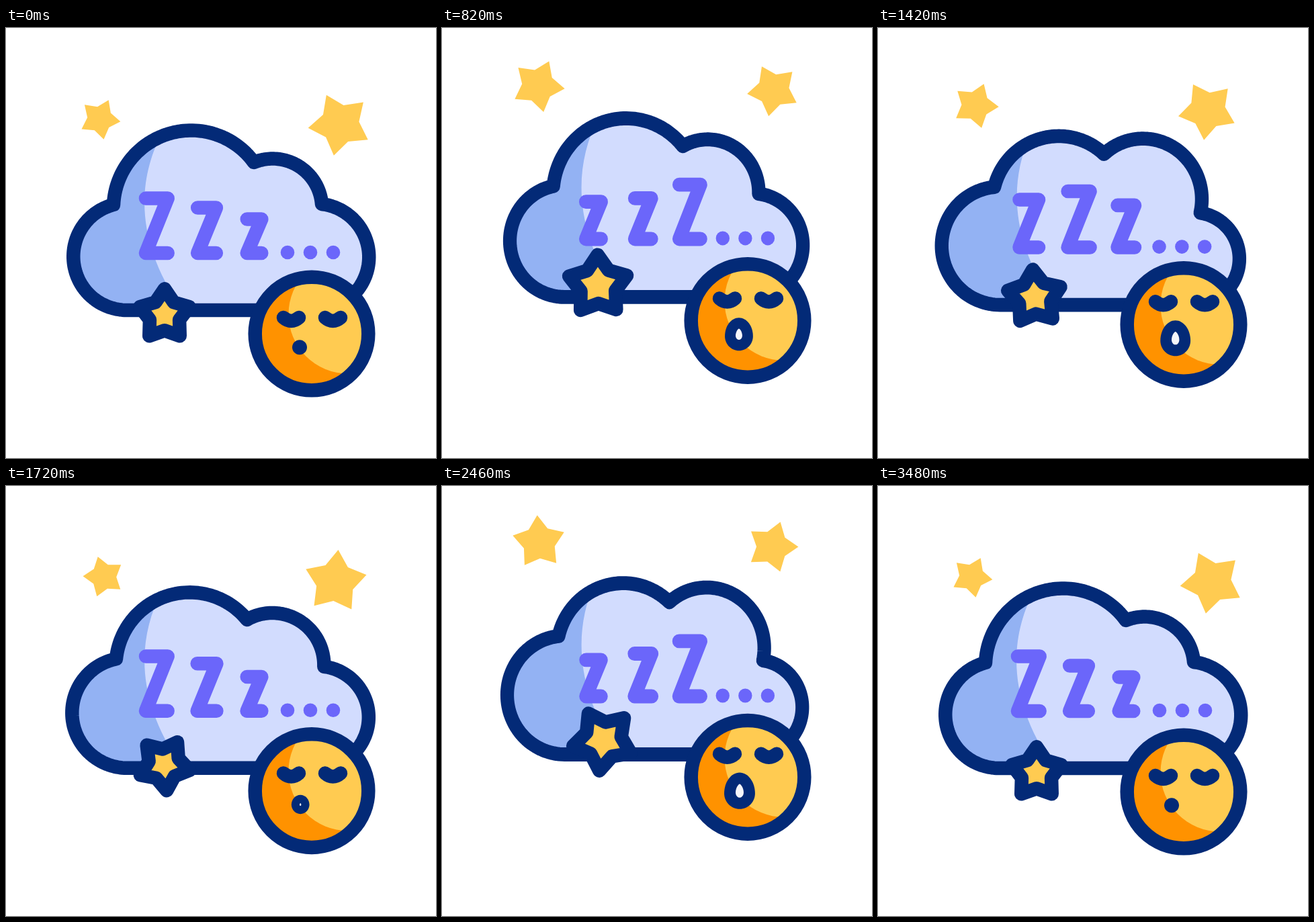
Recreate the animation shown at these times as an HTML page with a canvas. Size 640x640 px, loop 3600 ms.

```html
<!DOCTYPE html>
<html lang="en">
<head>
<meta charset="utf-8">
<style>
  html, body { margin: 0; height: 100%; overflow: hidden; background: #fff; }
  canvas { display: block; }
</style>
</head>
<body>
<canvas id="stage" width="640" height="640"></canvas>
<script>
const ctx = document.getElementById('stage').getContext('2d');
const NAVY = '#032a77', LIGHT = '#d2dcfe', SHADE = '#93b2f3', VIOLET = '#6b66fa',
      YELLOW = '#ffcb51', ORANGE = '#ff9200';
const LOOP = 3600, LINE = 20.5;
const { PI, sin, cos, hypot, atan2 } = Math;

// Turning points of each up-and-down motion, in ms
const CLOUD_KEYS = [220, 940, 1770, 2540, 3380];
const PUFF_KEYS = [520, 1340, 1945, 2600, 3420];
const FACE_KEYS = [240, 1060, 1840, 2630, 3480];
const MOUTH_KEYS = [280, 1180, 1910, 2700, 3490];

// Lobe centres and the creases between them, at rest and puffed
const CALM = { lobes: [[180, 340], [276, 268], [397, 268], [461, 341]],
               creases: [[160, 263], [369, 200], [470, 262]] };
const PUFFED = { lobes: [[181, 332], [268, 270], [391, 260], [471, 352.5]],
                 creases: [[173, 245], [335, 197], [481, 285]] };

const clamp = x => Math.min(1, Math.max(0, x));
const swing = angle => (1 - cos(angle)) / 2;

// Grows by PI between neighbouring turning points
function phase(t, keys) {
  let sum = 0;
  for (let i = 1; i < keys.length; i++)
    sum += clamp((t - keys[i - 1]) / (keys[i] - keys[i - 1]));
  return sum * PI;
}

function fill(color) { ctx.fillStyle = color; ctx.fill(); }

function stroke(color) {
  ctx.strokeStyle = color;
  ctx.lineWidth = LINE;
  ctx.lineCap = ctx.lineJoin = 'round';
  ctx.stroke();
}

function disc(x, y, r, color) {
  ctx.beginPath();
  ctx.arc(x, y, r, 0, 2 * PI);
  if (color) fill(color);
}

// Clockwise curve around a centre; the radius blends from one end to the other
function lobe([x, y], [ax, ay], [bx, by]) {
  const from = atan2(ay - y, ax - x), r0 = hypot(ax - x, ay - y), r1 = hypot(bx - x, by - y);
  const turn = (atan2(by - y, bx - x) - from + 2 * PI) % (2 * PI);
  for (let k = 0; k <= 1; k += 1 / 64) {
    const a = from + turn * k, r = r0 + (r1 - r0) * k;
    ctx.lineTo(x + r * cos(a), y + r * sin(a));
  }
}

function cloudPath(m) {
  const mix = key => CALM[key].map((p, i) => p.map((v, j) => v + (PUFFED[key][i][j] - v) * m));
  const lobes = mix('lobes'), creases = mix('creases');
  const points = [[lobes[0][0], 420], ...creases, [lobes[3][0], 420]];
  ctx.beginPath();
  lobes.forEach((centre, i) => lobe(centre, points[i], points[i + 1]));
  ctx.closePath();
}

function letterZ(x, height) {
  const h = height - LINE, w = (height * 0.36 - 4) / 2, y = 335;
  ctx.beginPath();
  ctx.moveTo(x - w, y - h);
  ctx.lineTo(x + w, y - h);
  ctx.lineTo(x - w, y);
  ctx.lineTo(x + w, y);
  stroke(VIOLET);
}

function drawCloud(t) {
  const angle = phase(t, CLOUD_KEYS), up = swing(angle);
  const puff = swing(phase(t, PUFF_KEYS));
  ctx.save();
  ctx.translate(320, 420 - 21 * up);
  ctx.scale(1 - 0.013 * up, 1 + 0.018 * up);
  ctx.translate(-320, -420);

  cloudPath(puff);
  fill(LIGHT);
  ctx.save();
  ctx.clip();
  ctx.beginPath();
  ctx.moveTo(60, 140);
  ctx.lineTo(241, 140);
  ctx.bezierCurveTo(196, 215, 186, 310, 263, 420);
  ctx.lineTo(60, 420);
  fill(SHADE);
  ctx.restore();
  cloudPath(puff);
  stroke(NAVY);

  letterZ(224.3, 102 - 29 * up);
  letterZ(299, 88 - 16 * sin(angle));
  letterZ(369.5, 71 + 31 * up);
  for (const x of [419, 453, 487]) disc(x, 334, 10.3, VIOLET);
  ctx.restore();
}

function starPath(x, y, radius, degrees) {
  ctx.beginPath();
  for (let i = 0; i < 10; i++) {
    const a = degrees * PI / 180 + i * PI / 5, r = i % 2 ? radius * 0.6 : radius;
    ctx.lineTo(x + r * sin(a), y - r * cos(a));
  }
  ctx.closePath();
}

function drawStars(t) {
  const up = swing(phase(t, CLOUD_KEYS));
  const u = clamp((t - 220) / 3160), arch = sin(PI * u);
  const spin = 360 * clamp((t - 200) / 3140);
  starPath(139.6 + 6 * arch, 135.4 - 53 * up, 31 + 9.5 * up, 25 + spin);
  fill(YELLOW);
  starPath(497 - 7 * arch, 143 - 54 * up, 47.7 - 9 * up, spin - 25);
  fill(YELLOW);
  starPath(236 - 4 * sin(2 * PI * u), 427 - 40 * up - 12 * arch, 38.7 + 7 * up, spin);
  fill(YELLOW);
  stroke(NAVY);
}

function eye(x, y) {
  ctx.beginPath();
  ctx.moveTo(x - 11.5, y);
  ctx.quadraticCurveTo(x, y + 10, x + 11.5, y);
  stroke(NAVY);
}

// Egg whose widest line sits below its middle by `sag`; `tip` rounds the top
function egg(x, y, rx, ry, sag, tip, color) {
  const wide = y + sag * ry, top = y - ry, bottom = y + ry;
  const high = wide - 0.55 * (wide - top), low = wide + 0.55 * (bottom - wide);
  ctx.beginPath();
  ctx.moveTo(x, top);
  ctx.bezierCurveTo(x + tip * rx, top, x + rx, high, x + rx, wide);
  ctx.bezierCurveTo(x + rx, low, x + 0.55 * rx, bottom, x, bottom);
  ctx.bezierCurveTo(x - 0.55 * rx, bottom, x - rx, low, x - rx, wide);
  ctx.bezierCurveTo(x - rx, high, x - tip * rx, top, x, top);
  fill(color);
}

function drawFace(t) {
  const open = 1.08 * swing(phase(t, MOUTH_KEYS));
  ctx.save();
  ctx.translate(0, -24.3 * swing(phase(t, FACE_KEYS)));

  disc(455, 455, 84.3, ORANGE);
  ctx.save();
  ctx.clip();
  disc(509, 426, 88.5, YELLOW);
  ctx.restore();
  disc(455, 455, 84.3);
  stroke(NAVY);

  eye(424.5, 431 - 12.5 * open);
  eye(486.5, 431 - 12.5 * open);
  const x = 437 + 7 * open;
  egg(x, 475.3, 11 + 14 * open, 11 + 19 * open, 0.17 * open, 0.55, NAVY);
  if (open > 0) egg(x, 475.3, 7 * open, 11.8 * open, 0.25, 0.25, '#f5f6fa');
  ctx.restore();
}

function draw(now) {
  const t = now % LOOP;
  ctx.clearRect(0, 0, 640, 640);
  drawCloud(t);
  drawStars(t);
  drawFace(t);
}

const start = performance.now();
function tick() {
  draw(performance.now() - start);
  requestAnimationFrame(tick);
}
tick();
</script>
</body>
</html>
```
